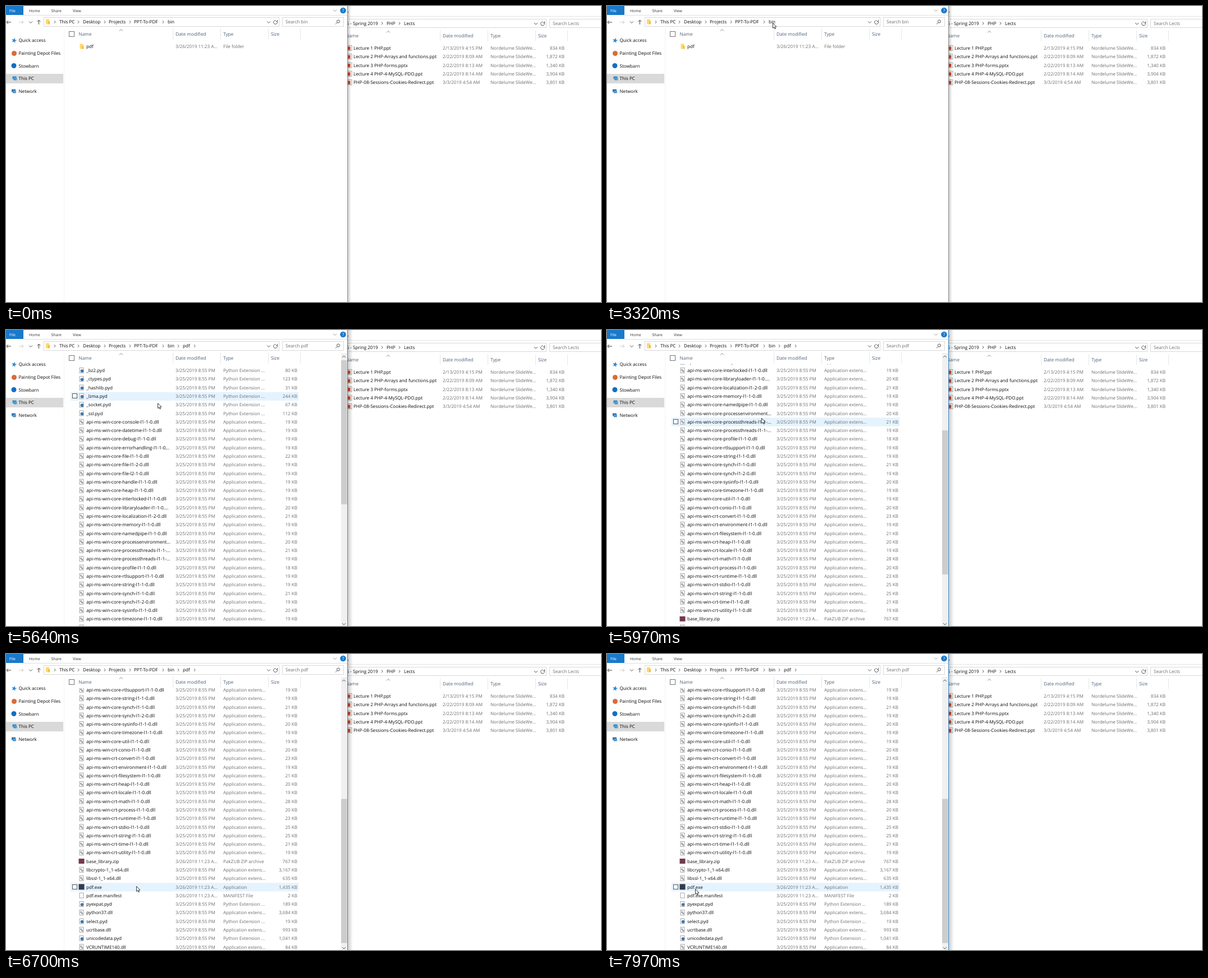
An HTML page with a canvas that plays this animation: 1060x528 px, repeating every 8000 ms.

```html
<!DOCTYPE html>
<html lang="en">
<head>
<meta charset="utf-8">
<title>File windows</title>
<style>
html, body { margin: 0; width: 100%; height: 100%; overflow: hidden; background: #fff; }
canvas { display: block; }
</style>
</head>
<body>
<canvas id="stage" width="1060" height="528"></canvas>
<script>
const ctx = document.getElementById('stage').getContext('2d');
const LOOP = 8000, ROW = 15.285, FIRST = 72.4, MAX_SCROLL = 375;
const INK = '#0a0a0a', GRAY = '#6d6d6d', HEAD = '#4c607a', BLUE = '#1979ca', HOVER = '#e5f3ff';

// Cursor path: time, x, y. Equal neighbours are rests.
const path = [
  [400, 943, 512], [1200, 524, 322], [2020, 338, 79], [2060, 338, 79],
  [2620, 295, 30], [3320, 295, 30], [3960, 258, 73], [5340, 258, 73],
  [5640, 270, 130], [5850, 275, 157], [6270, 275, 157], [6620, 234, 416],
  [6700, 232, 414], [6970, 222, 404], [7040, 222, 404], [7300, 199, 388],
  [7580, 172, 411], [7820, 158, 428], [7850, 158, 430], [7970, 157, 419], [8000, 157, 419]
];
const clicks = [[2760, 2870], [4450, 4580], [4640, 4760]];
const ACTIVATE = 4580, CLEAR = 4900, OPEN = 5090, SEARCH = 5340;

const DAY = '3/25/2019 8:55 PM', LATER = '3/26/2019 11:23 A...';
const EXT = 'Application extens...', PY = 'Python Extension ...';
const file = (name, size, icon = 'dll', type = EXT, date = DAY) => ({ name, size: size + ' KB', icon, type, date });
const python = (name, size) => file(name + '.pyd', size, 'py', PY);
const api = (group, list) => list.split(' ').map(item => {
  const [part, size] = item.split(':');
  return file(`api-ms-win-${group}-${part}${/(\.|dll)$/.test(part) ? '' : '-l1-1-0.dll'}`, size);
});

const folder = [{ name: 'pdf', size: '', icon: 'folder', type: 'File folder', date: LATER }];
const files = [
  python('_bz2', 80), python('_ctypes', 123), python('_hashlib', 31),
  python('_lzma', 244), python('_socket', 67), python('_ssl', 112),
  ...api('core', 'console:19 datetime:19 debug:19 errorhandling-l1-1-0...:19 file:22 ' +
    'file-l1-2-0.dll:19 file-l2-1-0.dll:19 handle:19 heap:19 interlocked:19 ' +
    'libraryloader-l1-1-0....:20 localization-l1-2-0.dll:21 memory:19 namedpipe:19 ' +
    'processenvironment...:20 processthreads-l1-1-...:21 processthreads-l1-1-...:19 ' +
    'profile:18 rtlsupport:19 string:19 synch:21 synch-l1-2-0.dll:19 sysinfo:20 timezone:19 util:19'),
  ...api('crt', 'conio:20 convert:23 environment:19 filesystem:21 heap:20 locale:19 math:28 ' +
    'process:20 runtime:23 stdio:25 string:25 time:21 utility:19'),
  file('base_library.zip', 767, 'zip', 'PakZUB ZIP archive', LATER),
  file('libcrypto-1_1-x64.dll', '3,167'), file('libssl-1_1-x64.dll', 635),
  file('pdf.exe', '1,435', 'exe', 'Application', LATER),
  file('pdf.exe.manifest', 2, 'page', 'MANIFEST File', LATER),
  python('pyexpat', 189), file('python37.dll', '3,684'), python('select', 19),
  file('ucrtbase.dll', 993), python('unicodedata', '1,041'), file('VCRUNTIME140.dll', 84)
];
const lectures = [
  ['Lecture 1 PHP.ppt', '2/13/2019 4:15 PM', '834 KB'],
  ['Lecture 2 PHP-Arrays and functions.ppt', '2/22/2019 8:09 AM', '1,872 KB'],
  ['Lecture 3 PHP-forms.pptx', '2/22/2019 8:13 AM', '1,340 KB'],
  ['Lecture 4 PHP-4-MySQL-PDO.ppt', '2/22/2019 8:14 AM', '3,904 KB'],
  ['PHP-08-Sessions-Cookies-Redirect.ppt', '3/3/2019 4:54 AM', '3,801 KB']
];

function text(s, x, y, color = INK, size = 8.1, align = 'left') {
  ctx.font = `${size}px "Open Sans", "Noto Sans", sans-serif`;
  ctx.textAlign = align;
  ctx.fillStyle = color;
  ctx.fillText(s, x, y + 2.8);
}
function rect(x, y, w, h, color) {
  ctx.fillStyle = color;
  ctx.fillRect(x, y, w, h);
}
function box(x, y, w, h, color, fill = '#fff') {
  rect(x, y, w, h, fill);
  ctx.strokeStyle = color;
  ctx.lineWidth = 1;
  ctx.strokeRect(x + .5, y + .5, w - 1, h - 1);
}
function dot(x, y, r, color) {
  ctx.fillStyle = color;
  ctx.beginPath();
  ctx.arc(x, y, r, 0, 7);
  ctx.fill();
}
function line(points, color = '#555', width = 1) {
  ctx.strokeStyle = color;
  ctx.lineWidth = width;
  ctx.beginPath();
  points.forEach(([x, y]) => ctx.lineTo(x, y));
  ctx.stroke();
}
const down = (x, y, color) => line([[x - 3, y - 1.5], [x, y + 1.5], [x + 3, y - 1.5]], color);
const up = (x, y, color) => line([[x - 3, y + 1.5], [x, y - 1.5], [x + 3, y + 1.5]], color);
const right = (x, y) => line([[x - 1.2, y - 2.3], [x + 1.2, y], [x - 1.2, y + 2.3]]);

function arrow(x, y, angle, color) {
  ctx.save();
  ctx.translate(x, y);
  ctx.rotate(angle);
  line([[4, 0], [-4, 0]], color);
  line([[-1, -3], [-4, 0], [-1, 3]], color);
  ctx.restore();
}
function refresh(x, y) {
  ctx.strokeStyle = '#555';
  ctx.lineWidth = 1;
  ctx.beginPath();
  ctx.arc(x, y, 3.4, -.5, 4.9);
  ctx.stroke();
  line([[x + 3.6, y - 4], [x + 3.4, y - 1.4], [x + .8, y - 1.6]]);
}
function folderIcon(x, y) {
  rect(x - 3, y - 4.5, 6, 9, '#ffd96b');
  rect(x + 1, y - 1, 3, 5.5, '#f3bd46');
}
function monitor(x, y, color) {
  rect(x - 4, y - 3.5, 7, 5, color);
  rect(x - 1, y - 1, 5, 4.5, '#4aa3df');
  rect(x - 2, y + 2, 3, 1, '#53616d');
}
function star(x, y) {
  ctx.fillStyle = '#2f87d0';
  ctx.beginPath();
  for (let i = 0; i < 10; i++) {
    const a = i * Math.PI / 5 - 1.35, r = i % 2 ? 2 : 5;
    ctx.lineTo(x + r * Math.cos(a), y + r * Math.sin(a));
  }
  ctx.fill();
}
function icon(kind, x, y) {
  if (kind === 'folder') return folderIcon(x, y);
  if (kind === 'zip') return rect(x - 5, y - 4.5, 10, 9, '#75384f');
  if (kind === 'exe') return rect(x - 5, y - 5, 10, 10, '#2f3b52');
  box(x - 4, y - 5, 8, 10, '#a5a5a5');
  if (kind === 'dll') {
    dot(x - .8, y - .8, 1.8, '#a4abb0');
    dot(x + 1.2, y + 1.6, 1.5, '#8f989e');
  }
  if (kind === 'py') dot(x + 1, y + 1, 2.8, '#3d78ab');
  if (kind === 'slides') rect(x - 5, y - 2.5, 6, 6, '#cf4a2c');
}

// Column headers share one layout in both windows.
function headers(nameX, x, y, sortX) {
  text('Name', nameX, y, HEAD, 8.25);
  ['Date modified', 'Type', 'Size'].forEach((s, i) => text(s, x + i * 85, y, HEAD, 8.25));
  [-5, 80, 165, 222].forEach(d => rect(x + d, y - 10, 1, 19, '#e5e5e5'));
  up(sortX, y - 7.5, '#888');
}
function crumbs(list, y) {
  list.forEach(([s, x, arrowX]) => {
    text(s, x, y);
    if (arrowX) right(arrowX, y);
  });
}

function rightWindow() {
  text('w', 605, 10.5, '#444', 6.9);
  rect(609, 18, 451, 1, '#e4e4e4');
  box(560, 23, 403, 16, '#d9d9d9');
  crumbs([['5 - Spring 2019', 606.5, 670], ['PHP', 678, 701], ['Lects', 709]], 31);
  down(944, 31.5);
  refresh(956, 31.5);
  box(968, 23, 120, 16, '#d9d9d9');
  text('Search Lects', 974, 31, GRAY);
  headers(605, 778, 53.5, 681);
  lectures.forEach(([name, date, size], i) => {
    const y = 75.3 + i * ROW;
    icon('slides', 612.5, y - .4);
    text(name, 619, y);
    text(date, 778, y, GRAY);
    text('Nordelume SlideWe...', 863, y, GRAY);
    text(size, 995, y, GRAY, 8.1, 'right');
  });
}

function sidebar() {
  rect(0, 121, 102, 17, '#d9d9d9');
  rect(103, 41, 1, 487, '#f3f3f3');
  star(14.5, 61.5);
  dot(14.5, 84.5, 4.5, '#dc6b35');
  dot(14, 106.5, 4.5, '#0f6fc5');
  monitor(15.5, 129, '#3d8dc6');
  monitor(14, 152, '#3579b4');
  ['Quick access', 'Painting Depot Files', 'Stowbarn', 'This PC', 'Network']
    .forEach((s, i) => text(s, 22.5, 61.5 + i * 22.6));
}

function toolbar(t) {
  rect(0, 0, 31, 16, BLUE);
  rect(31, 16, 577, 1, '#dedfe0');
  text('File', 6, 8, '#fff', 6.9);
  text('Home', 41, 8, '#333', 6.9);
  text('Share', 80.5, 8, '#333', 6.9);
  text('View', 119, 8, '#333', 6.9);
  down(586, 8, '#999');
  dot(600.5, 8, 5.3, BLUE);
  text('?', 600.5, 8.2, '#fff', 8, 'center');

  arrow(5, 29, 0, '#444');
  arrow(27, 29, Math.PI, '#ccc');
  down(44, 29);
  arrow(58.5, 29, Math.PI / 2, '#444');
  box(67, 20, 420, 17, '#d9d9d9');
  folderIcon(74, 28);
  right(87, 28.5);
  const opened = t >= OPEN;
  crumbs([['This PC', 95, 129], ['Desktop', 137, 176], ['Projects', 183, 221],
    ['PPT-To-PDF', 228, 280], ['bin', 288, opened && 307]], 28.5);
  if (opened) crumbs([['pdf', 315, 336]], 28.5);
  down(468, 29);
  refresh(480, 29);
  box(492, 20, 110, 17, '#d9d9d9');
  text(t < SEARCH ? 'Search bin' : 'Search pdf', 498, 28.5, GRAY);
  ctx.strokeStyle = '#555';
  ctx.beginPath();
  ctx.arc(592, 27.5, 2.6, 0, 7);
  ctx.stroke();
  line([[590, 29.5], [587, 32.5]]);
}

function scrollAt(t) {
  const notches = Math.max(0, Math.floor((t - 5690) / 60) + 1);
  return Math.min(MAX_SCROLL, notches * 3 * ROW);
}

function cursorAt(t) {
  const still = (a, b) => a[1] === b[1] && a[2] === b[2];
  const slope = (i, k) => {
    const a = path[i - 1], b = path[i], c = path[i + 1];
    if (!a || !c || still(a, b) || still(b, c)) return 0;
    return (c[k] - a[k]) / (c[0] - a[0]);
  };
  let i = 0;
  while (i < path.length - 2 && t >= path[i + 1][0]) i++;
  const a = path[i], b = path[i + 1], d = b[0] - a[0];
  const u = Math.min(1, Math.max(0, (t - a[0]) / d)), v = 1 - u;
  return [1, 2].map(k =>
    a[k] * v * v * (1 + 2 * u) + b[k] * u * u * (3 - 2 * u) +
    d * u * v * (slope(i, k) * v - slope(i + 1, k) * u));
}

function fileList(t) {
  // The highlight trails the cursor slightly.
  const [x, y] = cursorAt(t - 50), scroll = scrollAt(t);
  const rows = t < CLEAR ? folder : t < OPEN ? [] : files;
  const inside = t > 400 && x > 115 && x < 522 && y > 60;
  const hovered = inside ? Math.floor((y - FIRST + ROW / 2 + scroll) / ROW) : -1;

  if (t > 3320 && t < 3960 && y > 41 && y < 60) rect(105, 41, 192, 19, '#d9ebf9');
  box(112, 45, 10, 10, '#777');
  headers(129.5, 302, 50.5, 205);

  ctx.save();
  ctx.beginPath();
  ctx.rect(104, 60.5, 504, 468);
  ctx.clip();
  rows.forEach((row, i) => {
    const cy = FIRST + i * ROW - scroll;
    if (cy < 50 || cy > 540) return;
    if (i === hovered) {
      const selected = t >= ACTIVATE && t < CLEAR;
      rect(115, cy - 7.6, 406.5, ROW, selected ? '#cce8ff' : HOVER);
      box(118, Math.round(cy - 5), 9, 9, '#555');
    }
    icon(row.icon, 134.5, cy - .4);
    text(row.name, 143, cy, INK, row.name.startsWith('api') ? 8.25 : 8.1);
    text(row.date, 302, cy, GRAY);
    text(row.type, 387, cy, GRAY);
    text(row.size, 519, cy, GRAY, 8.1, 'right');
  });
  ctx.restore();

  if (t >= OPEN) {
    rect(597, 41, 10.5, 487, '#f0f0f0');
    rect(597, 54 + 204.5 * scroll / MAX_SCROLL, 10.5, 257, '#cdcdcd');
    up(602, 47.5);
    down(602, 524.5);
  }
}

function leftWindow(t) {
  const active = t >= ACTIVATE, reach = active ? 9 : 6;
  const shade = ctx.createLinearGradient(609, 0, 609 + reach, 0);
  shade.addColorStop(0, 'rgba(0,0,0,.2)');
  shade.addColorStop(1, 'rgba(0,0,0,0)');
  rect(609, 0, reach, 528, shade);
  rect(0, 0, 608, 528, '#fff');
  rect(608, 0, 1, 528, active ? '#3d87c4' : '#8f8f8f');
  sidebar();
  toolbar(t);
  fileList(t);
}

function pointer(t) {
  if (t < 400) return;
  const [x, y] = cursorAt(t);
  if (clicks.some(([a, b]) => t >= a && t < b)) dot(x, y + .8, 8.5, 'rgba(246,238,58,.8)');
  ctx.save();
  ctx.translate(x + .5, y + .5);
  ctx.beginPath();
  [[0, 0], [0, 9], [2.1, 7.2], [3.6, 10.4], [5, 9.8], [3.6, 6.7], [6.5, 6.5]]
    .forEach(p => ctx.lineTo(...p));
  ctx.closePath();
  ctx.fillStyle = '#fff';
  ctx.fill();
  ctx.strokeStyle = '#222';
  ctx.lineWidth = .9;
  ctx.stroke();
  ctx.restore();
}

const start = performance.now();
function frame() {
  const t = (performance.now() - start) % LOOP;
  ctx.textRendering = 'geometricPrecision';
  rect(0, 0, 1060, 528, '#fff');
  rightWindow();
  leftWindow(t);
  pointer(t);
  requestAnimationFrame(frame);
}
frame();
</script>
</body>
</html>
```
